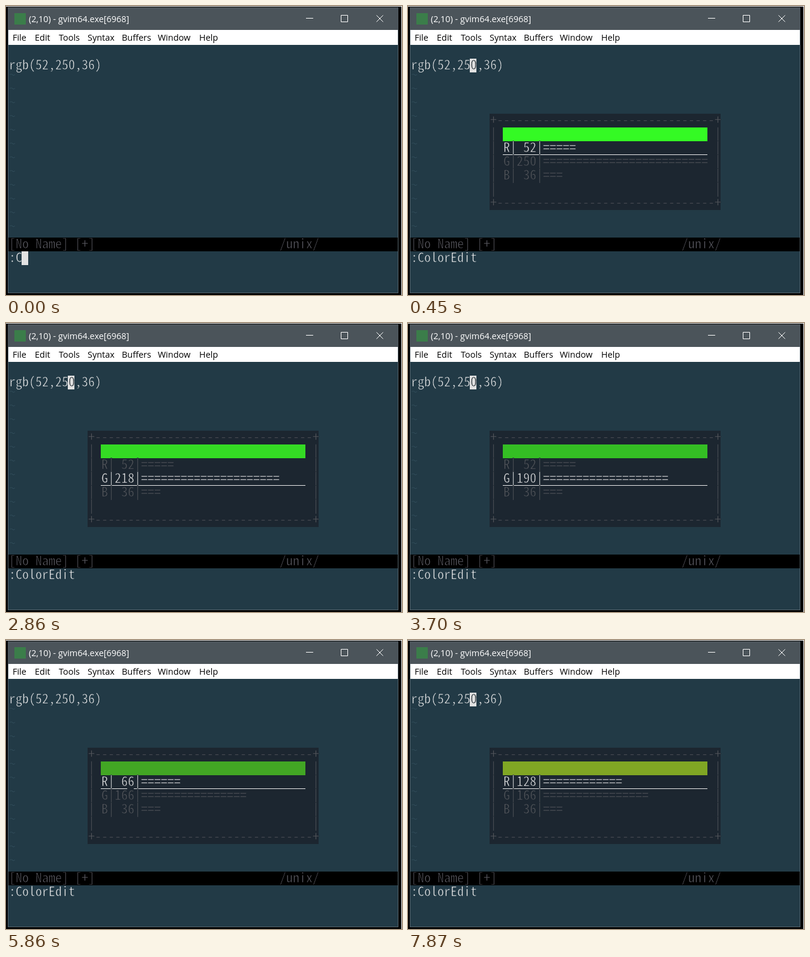
These frames come from a looping animation (660x483 px, 8 s). An HTML page with a canvas:

```html
<!DOCTYPE html>
<html lang="en">
<head>
<meta charset="utf-8">
<title>Color editor popup</title>
<style>
html, body { margin: 0; width: 100%; height: 100%; overflow: hidden; background: #000; }
canvas { display: block; }
</style>
</head>
<body>
<canvas id="stage" width="660" height="483"></canvas>
<script>
const ctx = document.getElementById('stage').getContext('2d');
const LOOP = 8000, CELL = 11, ROW = 23, LEFT = 4, TOP = 65, WIDTH = 649;
const POPUP_COL = 12, POPUP_ROW = 5;
const BG = '#223a46', POPUP_BG = '#1c2630', STATUS_BG = '#000', CURSOR_BG = '#e2e2e2';
const TEXT = '#ececec', DIM = '#54575c', STATUS = '#5c5c64';
const UI_FONT = '14.45px "Open Sans", "Noto Sans", sans-serif';
const MONO = '"Noto Sans Mono CJK JP", "Noto Sans Mono", "Liberation Mono", monospace';

// Size the monospaced font so that one character fills one cell.
ctx.font = `300 100px ${MONO}`;
const GRID_FONT = `300 ${100 * CELL / ctx.measureText('0').width}px ${MONO}`;
ctx.lineJoin = 'round';

const greenTimes = [1410, 1980, 2120, 2260, 2430, 2570, 2700, 2840, 3010,
  3150, 3280, 3410, 3570, 3700, 3820, 3960, 4100, 4240, 4380, 4520];
const redTimes = [5040, 5600, 5730, 5860, 5990, 6120, 6250, 6370, 6500,
  6670, 6800, 6940, 7080, 7210, 7350, 7490, 7620, 7750, 7870];
const longSteps = [2430, 3010, 3570, 6670];
// Repaints during which the text cursor is briefly missing.
const flickers = [[2570, 2700], [3410, 3570], [5860, 5990], [7210, 7350]];

// The first key press changes the value by 2; held keys add 4 or 6 per repaint.
function stepped(start, dir, times, t) {
  return times.filter(s => s <= t).reduce((v, s, i) =>
    v + dir * (i === 0 ? 2 : longSteps.includes(s) ? 6 : 4), start);
}

function rect(x, y, w, h, color) {
  ctx.fillStyle = color;
  ctx.fillRect(x, y, w, h);
}

const cellX = col => LEFT + col * CELL;
const cellY = row => TOP + row * ROW;

// The background-coloured outline thins the letters to a light weight.
function print(str, col, row, color, bg, dy = 0) {
  ctx.font = GRID_FONT;
  ctx.fillStyle = color;
  ctx.strokeStyle = bg;
  ctx.lineWidth = 0.65;
  [...str].forEach((ch, i) => {
    const x = cellX(col + i) + 1, y = cellY(row) + 18 + dy;
    ctx.fillText(ch, x, y);
    ctx.strokeText(ch, x, y);
  });
}

function label(str, x, y, color) {
  ctx.font = UI_FONT;
  ctx.fillStyle = color;
  ctx.fillText(str, x, y);
}

function cursor(col, row, ch = '') {
  rect(cellX(col), cellY(row), CELL, ROW, CURSOR_BG);
  print(ch, col, row, '#182228', CURSOR_BG);
}

function drawWindow() {
  rect(0, 0, 660, 483, '#fff');
  rect(0, 1, 659, 482, '#000');
  rect(3, 2, WIDTH + 2, 478, '#57656d');
  rect(3, 2, WIDTH + 2, 38, '#4b545a');
  rect(LEFT, 40, WIDTH, 25, '#fff');
  rect(LEFT, TOP, WIDTH, 414, BG);
  rect(14, 12, 19, 19, '#3b7d4a');
  label('(2,10) - gvim64.exe[6968]', 38, 27, '#fff');

  ctx.strokeStyle = '#fff';
  ctx.lineWidth = 1;
  ctx.strokeRect(558.5, 15.5, 11, 11);
  ctx.beginPath();
  ctx.moveTo(500, 20.5); ctx.lineTo(512, 20.5);
  ctx.moveTo(617.5, 15.5); ctx.lineTo(628.5, 26.5);
  ctx.moveTo(628.5, 15.5); ctx.lineTo(617.5, 26.5);
  ctx.stroke();

  const menu = { File: 11, Edit: 48, Tools: 88, Syntax: 136, Buffers: 193, Window: 253, Help: 322 };
  for (const name in menu) label(name, menu[name], 58, '#000');
}

function drawEditor(t, flicker) {
  print('rgb(52,250,36)', 0, 1, TEXT, BG);
  for (let row = 2; row < 14; row++) print('~', 0, row, '#344f5c', BG, -6);
  rect(LEFT, cellY(14), WIDTH, ROW, STATUS_BG);
  print('[No Name] [+]', 0, 14, STATUS, STATUS_BG);
  print('/unix/', 41, 14, STATUS, STATUS_BG);

  const command = t < 160 ? ':C' : ':ColorEdit';
  print(command, 0, 15, TEXT, BG);
  if (t < 450) cursor(command.length, 15);
  else if (!flicker) cursor(9, 1, '0');
}

function drawPopup(t, flicker) {
  const col = POPUP_COL, row = POPUP_ROW, inner = col + 2;
  const values = [stepped(52, 1, redTimes, t), stepped(250, -1, greenTimes, t), 36];
  const selected = t >= 850 && t < 4660 ? 1 : 0;
  const edge = '+' + '-'.repeat(33) + '+';
  const write = (str, c, r, color = DIM) => print(str, c, r, color, POPUP_BG);

  rect(cellX(col), cellY(row), 35 * CELL, 7 * ROW, POPUP_BG);
  write(edge, col, row);
  write(edge, col, row + 6);
  for (let i = 1; i < 6; i++) {
    write('|', col, row + i);
    write('|', col + 34, row + i);
  }
  rect(cellX(inner), cellY(row + 1), 31 * CELL, ROW, `rgb(${values})`);

  values.forEach((v, i) => {
    const y = row + 2 + i, active = i === selected;
    const line = `${'RGB'[i]}|${String(v).padStart(3)}|${'='.repeat(v / 10)}`;
    write(line, inner, y, active ? TEXT : DIM);
    if (!active) return;
    rect(cellX(inner), cellY(y) + 22, 31 * CELL, 1, TEXT);
    if (flicker) rect(cellX(inner + 4), cellY(y) + 22, CELL, 1, POPUP_BG);
  });
}

function draw(now) {
  const t = now % LOOP;
  const flicker = flickers.some(([from, to]) => t >= from && t < to);
  drawWindow();
  drawEditor(t, flicker);
  if (t >= 450) drawPopup(t, flicker);
}

let begin;
function tick(now) {
  begin ??= now;
  draw(now - begin);
  requestAnimationFrame(tick);
}
draw(0);
requestAnimationFrame(tick);
</script>
</body>
</html>
```
